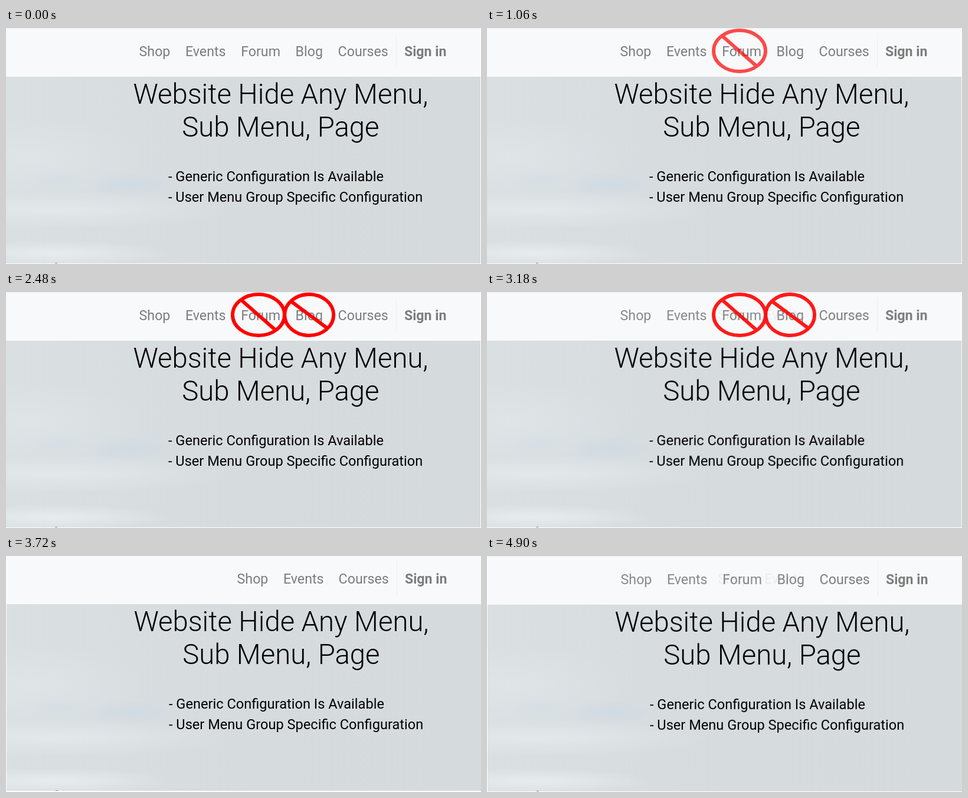
Animation of 805x402 px, one loop 4960 ms. Source, as an HTML page:

```html
<!DOCTYPE html>
<html lang="en">
<head>
<meta charset="utf-8">
<title>Hide any menu</title>
<style>
  html, body { margin: 0; width: 100%; height: 100%; overflow: hidden; background: #fff; }
  svg { display: block; width: 805px; height: 402px; font: 23.6px Roboto, sans-serif; }
  .nav { fill: #7c7d7d; font-size: 23.2px; }
  .title { font-size: 47.25px; font-weight: 300; text-anchor: middle; }
  .sign { fill: none; stroke: #f00; stroke-width: 6; }
</style>
</head>
<body>
<svg id="stage" viewBox="0 0 805 402">
  <defs>
    <linearGradient id="sky">
      <stop offset="0" stop-color="#dadfe2"/>
      <stop offset=".5" stop-color="#d6dbde"/>
      <stop offset="1" stop-color="#d5dadd"/>
    </linearGradient>
    <radialGradient id="light">
      <stop offset="0" stop-color="#edf3f4" stop-opacity=".7"/>
      <stop offset="1" stop-color="#edf3f4" stop-opacity="0"/>
    </radialGradient>
    <radialGradient id="blue">
      <stop offset="0" stop-color="#c9d9e8" stop-opacity=".5"/>
      <stop offset="1" stop-color="#c9d9e8" stop-opacity="0"/>
    </radialGradient>
    <clipPath id="page"><rect width="804" height="401"/></clipPath>
    <g id="base">
      <g clip-path="url(#page)">
        <rect width="805" height="83" fill="#f8f9fa"/>
        <rect width="805" height="1" fill="#eeeff0"/>
        <rect x="661" y="10" width="1" height="58" fill="#eeeff0"/>
        <rect y="83" width="805" height="319" fill="url(#sky)"/>
        <g fill="url(#light)">
          <ellipse cx="40" cy="220" rx="200" ry="70" opacity=".4"/>
          <ellipse cx="90" cy="310" rx="290" ry="32" opacity=".7"/>
          <ellipse cx="80" cy="384" rx="200" ry="22"/>
        </g>
        <g fill="url(#blue)">
          <ellipse cx="210" cy="267" rx="75" ry="22"/>
          <ellipse cx="85" cy="258" rx="60" ry="18" opacity=".5"/>
        </g>
        <rect x="83" y="400" width="4" height="1" fill="#8c8078"/>
      </g>
      <g class="title">
        <text x="465.4" y="129">Website Hide Any Menu,</text>
        <text x="465.4" y="185">Sub Menu, Page</text>
      </g>
      <text x="275" y="261">- Generic Configuration Is Available</text>
      <text x="275" y="296">- User Menu Group Specific Configuration</text>
      <g class="nav">
        <text x="562.6" y="48">Courses</text>
        <text x="674.9" y="48" font-weight="700">Sign in</text>
      </g>
    </g>
  </defs>
</svg>
<script>
const HOLD = 700, STEP = 60, PART = HOLD + 9 * STEP;

const label = (x, word) => `<text class="nav" x="${x}" y="48">${word}</text>`;
const sign = (cx, rx, bar) =>
  `<g class="sign"><ellipse cx="${cx}" cy="39" rx="${rx}" ry="35"/><path d="${bar}"/></g>`;
const scene = (dx, dy, content) =>
  `<g><rect width="805" height="402" fill="#fff"/>
   <g transform="translate(${dx} ${dy})"><use href="#base"/>${content}</g></g>`;

const fullMenu = label(225.6, 'Shop') + label(303.9, 'Events') + label(398.2, 'Forum') + label(490.6, 'Blog');
const shortMenu = label(390.6, 'Shop') + label(468.9, 'Events');
const forumSign = sign(428, 44, 'M398 13L458 66');
const blogSign = sign(513.7, 41.5, 'M482 15L545 62');

const stage = document.getElementById('stage');
stage.insertAdjacentHTML('beforeend', [
  scene(0, 0, fullMenu),
  scene(0, 0, fullMenu + forumSign),
  scene(0, 0, fullMenu + forumSign + blogSign),
  scene(1, -1, shortMenu),
  scene(1, 0, fullMenu)
].join(''));
const scenes = [...stage.children].slice(1);

// Each part holds one scene, then fades to the next in nine steps.
function draw(now) {
  const t = now % (4 * PART);
  const current = Math.floor(t / PART);
  const local = t - current * PART;
  const mix = local < HOLD ? 0 : (Math.floor((local - HOLD) / STEP) + 1) / 10;
  scenes.forEach((el, i) => {
    const alpha = i === current ? 1 : i === current + 1 ? mix : 0;
    el.style.display = alpha ? '' : 'none';
    el.style.opacity = alpha;
  });
}

const start = performance.now();
function tick() {
  draw(performance.now() - start);
  requestAnimationFrame(tick);
}
tick();
</script>
</body>
</html>
```
